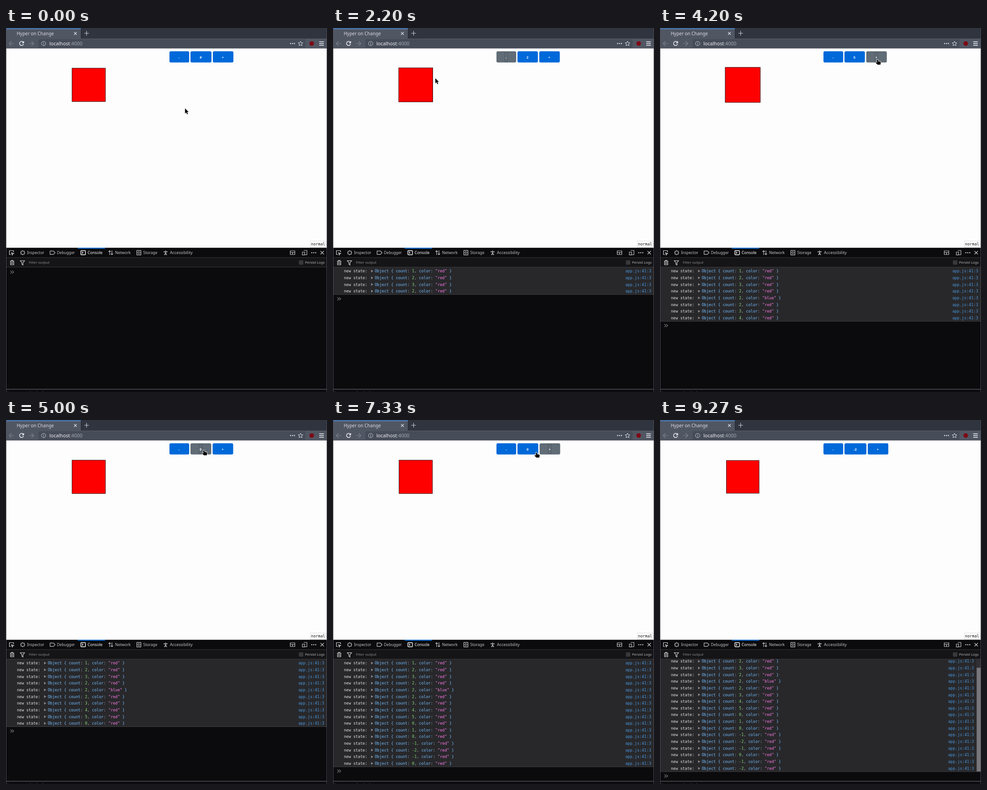
Animation of 703 by 797 pixels, one loop 9340 ms. Source, as an HTML page with a canvas:

```html
<!DOCTYPE html>
<html lang="en">
<head>
<meta charset="utf-8">
<title>Counter and console</title>
<style>
html, body { margin: 0; width: 100%; height: 100%; overflow: hidden; background: #0b0b0e; }
canvas { display: block; width: 703px; height: 797px; }
</style>
</head>
<body>
<canvas id="stage" width="703" height="797"></canvas>
<script>
const ctx = document.getElementById('stage').getContext('2d');
const LOOP = 9340, ROW = 14.65, LOG_TOP = 525, LOG_LAG = 75;
const UI = '"Noto Sans", sans-serif', MONO = '"DejaVu Sans Mono", monospace';
const MINUS = 0, RESET = 1, PLUS = 2;

// Time and action: a clicked button or a new color.
const actions = [
  [870, PLUS], [1070, PLUS], [1270, PLUS], [1800, MINUS],
  [2330, 'blue'], [2930, 'red'],
  [3650, PLUS], [3930, PLUS], [4200, PLUS], [4850, RESET],
  [5500, PLUS], [5980, RESET], [6450, MINUS], [6650, MINUS],
  [6980, PLUS], [7180, PLUS], [8130, MINUS], [8400, MINUS]
];

// Pointer stops: time, x, y.
const stops = [
  [200, 392, 176], [700, 474, 69], [1330, 474, 69], [1680, 379, 69],
  [1950, 379, 69], [2200, 224, 110], [2450, 186, 121], [2830, 186, 121],
  [2960, 226, 112], [3400, 476, 69], [4300, 476, 69], [4650, 433, 66],
  [5130, 433, 66], [5400, 473, 68], [5600, 473, 68], [5860, 428, 68],
  [6080, 428, 68], [6300, 391, 70], [6720, 391, 70], [6920, 474, 70],
  [7230, 474, 70], [7330, 445, 71], [7600, 385, 69], [8550, 385, 69],
  [9200, 420, 810]
];

let count, color, focus, logs;
function run(t) {
  count = '#'; color = 'red'; focus = -1; logs = [];
  for (const [at, act] of actions) {
    if (at > t) break;
    if (typeof act === 'string') color = act;
    else {
      focus = act;
      count = act === RESET ? 0 : (count === '#' ? 0 : count) + act - 1;
    }
    if (at + LOG_LAG <= t) logs.push([count, color]);
  }
  if (t > 8930) focus = -1;
}

function pointerAt(t) {
  const i = stops.findIndex(s => s[0] > t);
  if (i === 0) return stops[0].slice(1);
  if (i < 0) return stops[stops.length - 1].slice(1);
  const [t0, x0, y0] = stops[i - 1], [t1, x1, y1] = stops[i];
  const k = (t - t0) / (t1 - t0), e = k * k * (3 - 2 * k);
  return [x0 + (x1 - x0) * e, y0 + (y1 - y0) * e];
}

function rect(x, y, w, h, fill) {
  ctx.fillStyle = fill;
  ctx.fillRect(x, y, w, h);
}
function text(s, x, y, size, fill, family = UI, align = 'left', weight = '') {
  ctx.font = `${weight} ${size}px ${family}`;
  ctx.textAlign = align;
  ctx.fillStyle = fill;
  ctx.fillText(s, x, y);
  return ctx.measureText(s).width;
}
function rounded(x, y, w, h, r, fill) {
  ctx.beginPath();
  ctx.roundRect(x, y, w, h, r);
  ctx.fillStyle = fill;
  ctx.fill();
}
function stroke(d, x, y, c = '#d7d7db', w = 1.2) {
  ctx.save();
  ctx.translate(x, y);
  ctx.strokeStyle = c;
  ctx.lineWidth = w;
  ctx.stroke(new Path2D(d));
  ctx.restore();
}
function dots(x, y, gap, c) {
  for (let i = -1; i <= 1; i++) {
    ctx.beginPath();
    ctx.arc(x + i * gap, y, 1.3, 0, 7);
    ctx.fillStyle = c;
    ctx.fill();
  }
}

function drawBrowser() {
  rect(0, 0, 703, 23, '#2f343f');
  rect(0, 1, 164, 22, '#515663');
  rect(0, 0.8, 164, 1.6, '#5294e2');
  rect(164, 2, 1, 20, '#22262f');
  rect(0, 23, 703, 22, '#515663');
  rounded(71, 24.5, 585, 19, 2, '#474c59');
  rect(0, 44, 703, 1, '#3b404c');
  text('Hyper on Change', 23.5, 15.5, 9.95, '#d8dae0');
  stroke('M-3 -3L3 3M3 -3L-3 3', 152, 12, '#dcdee3');
  stroke('M-5 0H5M0 -5V5', 176.5, 11.5, '#c9ccd3');
  stroke('M5.5 0H-5M0 -5L-5 0L0 5', 12, 34, '#80848f');
  stroke('M-5.5 0H5M0 -5L5 0L0 5', 56, 34, '#80848f');
  stroke('M4 -2.5A4.5 4.5 0 1 0 4.5 1M4.7 -5V-1.5H1', 34, 34, '#eceef2', 1.5);
  stroke('M4.7 0A4.7 4.7 0 1 1 -4.7 0A4.7 4.7 0 1 1 4.7 0M0 -.7V2.8M0 -2.8V-1.6', 82.5, 34, '#c8cbd2', 1);
  const w = text('localhost', 95, 37.7, 10.7, '#f0f1f4');
  text(':4000', 95 + w, 37.7, 10.7, '#a4a8b2');
  dots(627.5, 34, 4.3, '#e0e2e7');
  stroke('M0 -5L1.6 -1.7L5.2 -1.4L2.4 1L3.3 4.7L0 2.7L-3.3 4.7L-2.4 1L-5.2 -1.4L-1.6 -1.7Z', 645, 34, '#e0e2e7', 1);
  ctx.beginPath();
  ctx.arc(669.5, 34, 5, 0, 7);
  ctx.fillStyle = '#7d0914';
  ctx.fill();
  stroke('M-5 -3.7H5M-5 0H5M-5 3.7H5', 691, 34, '#eceef2', 1.4);
}

function buttons() {
  const label = String(count);
  const mid = label === '#' ? 46 : label.length > 1 ? 48 : count === 0 ? 45.5 : 44.7;
  return [['-', 358, 43.2], [label, 404, mid], ['+', 407 + mid, 45]];
}

function drawPage(list, hover) {
  rect(0, 44.75, 703, 436.65, '#fdfdfd');
  const size = 74 * (1 + (count === '#' ? 0 : count) / 100);
  const x = 181.2 - size / 2, y = 124.5 - size / 2;
  rect(x, y, size, size, '#000');
  rect(x + .8, y + .8, size - 1.6, size - 1.6, color === 'red' ? '#f00' : '#00f');
  list.forEach(([label, bx, bw], i) => {
    const on = i === focus || i === hover;
    rounded(bx, 51, bw, 24.6, 3, on ? '#606c76' : '#0069d9');
    const cx = bx + bw / 2 - .5;
    if (i === focus) {
      ctx.save();
      ctx.setLineDash([1, 1]);
      ctx.strokeStyle = '#343c44';
      ctx.lineWidth = .8;
      const tw = label.length > 1 ? 10 : 6;
      ctx.strokeRect(cx - tw / 2, 53.5, tw, 20);
      ctx.restore();
    }
    text(label, cx, 66.5, 7.5, '#fff', UI, 'center', 'bold');
  });
  rounded(666, 466, 35.5, 14.5, 1.5, '#cfcfcf');
  rounded(666.7, 466.7, 34.1, 13.1, 1, '#fff');
  text('normal', 668, 476, 8.6, '#111', MONO);
}

function drawTools() {
  rect(0, 481.4, 703, 316, '#0b0b0e');
  rect(157, 481.5, 60, 1.6, '#0a84ff');
  rect(0, 502, 703, 1, '#333338');
  rect(0, 503, 703, 20.5, '#151517');
  rect(0, 523, 703, 1, '#38383d');
  const c = '#c4c4c8';
  stroke('M4.5 -1V-4.5H-4.5V4H-1M0 0L5 2L2.5 2.7L1.8 5Z', 12, 492);
  stroke('M-3.5 -3.5H3.5V3.5H-3.5ZM-5.5 0H-3.5M3.5 0H5.5M0 -5.5V-3.5M0 3.5V5.5', 36.5, 492, c);
  stroke('M-5.5 -3.7H2L5.5 0L2 3.7H-5.5Z', 102, 492, c);
  stroke('M-4 -4.5H4Q5 -4.5 5 -3.5V3.5Q5 4.5 4 4.5H-4Q-5 4.5 -5 3.5V-3.5Q-5 -4.5 -4 -4.5ZM-2.5 -2L-.5 0L-2.5 2', 169, 492, '#fff', 1.4);
  stroke('M-2.5 5V-4.5M-5 -2L-2.5 -4.5L0 -2M2.5 -5V4.5M0 2L2.5 4.5L5 2', 229.5, 492, c);
  stroke('M-4.5 -4.8H4.5V4.8H-4.5ZM-4.5 0H4.5M-1.5 -2.4H1.5M-1.5 2.4H1.5', 291, 492, c);
  stroke('M-4.5 -2H4.5M0 -2V1L-2.5 5M0 1L2.5 5M0 -5V-3.5', 349.5, 492, c, 1.6);
  [['Inspector', 46, 8.45], ['Debugger', 111.5, 8.3], ['Console', 178.7, 8.7], ['Network', 238.7, 8.55],
   ['Storage', 300.5, 8.5], ['Accessibility', 359, 8.85]].forEach(([s, x, size]) =>
    text(s, x, 495.2, size, s === 'Console' ? '#fff' : c));
  stroke('M-5 -4H5V4H-5ZM-5 -.5H5M0 -.5V4', 627.5, 492, c);
  stroke('M-2 -5H5V4.5H0M-5 -1.5H0V4.8H-5Z', 654, 492, c);
  dots(674, 492, 4.3, c);
  stroke('M-3.7 -3.7L3.7 3.7M3.7 -3.7L-3.7 3.7', 692.5, 492, '#e0e0e4');
  stroke('M-4.5 -3H4.5M-1.5 -3V-4.7H1.5V-3M-3.5 -3V5H3.5V-3M-1.2 -1V3.2M1.2 -1V3.2', 13.5, 513.5);
  stroke('M-4.7 -4.5H4.7L1.2 0V5L-1.2 3.5V0Z', 36, 514);
  text('Filter output', 50, 516.4, 7.75, '#8b8b90');
  rounded(641.5, 508.8, 9.5, 9.5, 1, '#38383d');
  text('Persist Logs', 655, 516.4, 7.6, '#b8b8bd');
}

function drawLog(value, hue, y, right) {
  const key = '#75bfff', dim = '#9ba6b5', base = y + 3;
  text('new state:', 24, base, 8.47, '#e4e4e8', MONO);
  ctx.beginPath();
  ctx.moveTo(83.5, y - 3);
  ctx.lineTo(88, y);
  ctx.lineTo(83.5, y + 3);
  ctx.fillStyle = '#8a8a8f';
  ctx.fill();
  let x = 91.5;
  const runs = [['Object { count', key], [': ', dim], [value, '#86de74'], [', ', dim],
    ['color', key], [': ', dim], [`"${hue}"`, '#ff7de9'], [' }', key]];
  for (const [s, c] of runs) x += text(s, x, base, 8.47, c, MONO);
  text('app.js:41:3', right, base, 8.55, '#4b97dc', MONO, 'right');
}

function drawConsole() {
  const full = logs.length * ROW, view = 245, shift = Math.max(0, full - view);
  const bottom = LOG_TOP + full - shift;
  if (logs.length) {
    ctx.save();
    ctx.beginPath();
    ctx.rect(0, 524, 703, bottom - 524);
    ctx.clip();
    rect(0, 524, 703, bottom - 524, '#28282b');
    logs.forEach(([value, hue], i) =>
      drawLog(String(value), hue, 532.3 + i * ROW - shift, shift ? 687.5 : 696.8));
    if (shift) {
      rect(693, 524, 9, 246, '#303034');
      const h = view * view / full;
      rect(693.5, bottom - h, 8.5, h, '#77777b');
    }
    ctx.restore();
    rect(0, bottom - .5, 703, 1, '#3f3f42');
  }
  stroke('M-3.5 -3.3L0 0L-3.5 3.3M.5 -3.3L4 0L.5 3.3', 13, bottom + 9.4, '#85858b', 1.1);
  rect(0, 790.5, 703, 1.2, '#77777c');
  rect(0, 791.7, 703, 6, '#0c0c10');
  text('browser mode, single', 3, 802.5, 8.2, '#b0b0b4', UI);
}

function drawFrame() {
  for (const x of [0, 702]) {
    rect(x, 0, 1, 797, '#4b4e58');
    rect(x, 45, 1, 436, '#75777e');
  }
}

function drawPointer(x, y, hand) {
  ctx.save();
  ctx.translate(x, y);
  const shape = new Path2D(hand
    ? 'M-1.2 1Q0 -.6 1.4 .8L2.2 4L6 4.4Q7.8 4.8 7.5 7L6.7 11.3H.4L-3.4 7.4Q-3.7 5.7 -1.8 6.2L-.4 6.8Z'
    : 'M0 0V11.2L2.6 8.8L4.5 13L6.4 12.1L4.5 8.1H8Z');
  ctx.lineJoin = 'round';
  ctx.lineWidth = 1.8;
  ctx.strokeStyle = '#f4f4f4';
  ctx.stroke(shape);
  ctx.fillStyle = '#080808';
  ctx.fill(shape);
  ctx.restore();
}

function draw(t) {
  run(t);
  const list = buttons();
  // Hover follows the pointer with a slight delay.
  const [hx, hy] = pointerAt(t - 70);
  const hover = list.findIndex(([, x, w]) => hx >= x && hx <= x + w && hy >= 51 && hy <= 75.6);
  drawBrowser();
  drawPage(list, hover);
  drawTools();
  drawConsole();
  drawFrame();
  const [x, y] = pointerAt(t);
  drawPointer(x, y, hover >= 0);
}

const start = performance.now();
function tick() {
  draw((performance.now() - start) % LOOP);
  requestAnimationFrame(tick);
}
tick();
</script>
</body>
</html>
```
